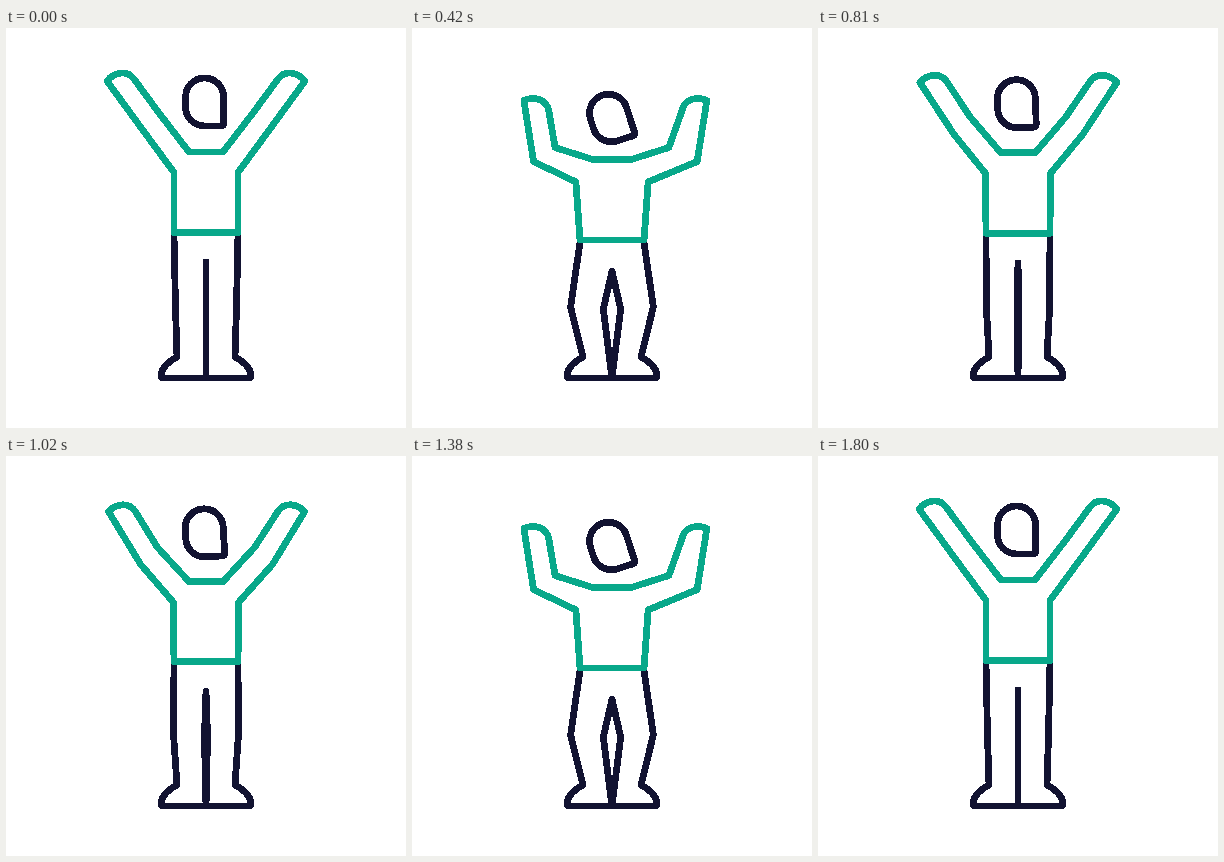
Recreate the animation shown at these times as an HTML page. Size 400x400 px, loop 3.33 s.

```html
<!DOCTYPE html>
<html lang="en">
<head>
<meta charset="utf-8">
<title>Stretching figure</title>
<style>
  html, body { margin: 0; width: 100%; height: 100%; overflow: hidden; background: #fff; }
  svg { display: block; width: 100%; height: 100%; }
  path {
    fill: none; stroke: #121331; stroke-width: 6.8;
    stroke-linecap: round; stroke-linejoin: round; shape-rendering: crispEdges;
  }
  #shirt { stroke: #08a88a; }
</style>
</head>
<body>
<svg viewBox="0 0 400 400">
  <path id="legs"/>
  <path id="shirt"/>
  <path id="head" d="M-19 -5 a19 19 0 0 1 38 0 V21 q0 3 -3 3 H0 a19 19 0 0 1 -19 -19 Z"/>
</svg>
<script>
const LOOP = 3330, STEP = 30, BEND = 450, ACTIVE = 4 * BEND, CENTER = 200;
const FOREARM_TURN = 27.4 * Math.PI / 180;

const byId = id => document.getElementById(id);
const legs = byId('legs'), shirt = byId('shirt'), head = byId('head');

// Two smooth bends down and up, then a rest.
function bendAt(time) {
  if (time >= ACTIVE) return 0;
  const phase = (time / BEND) % 2;
  const s = phase < 1 ? phase : 2 - phase;
  return s * s * (3 - 2 * s);
}

// Half outlines use x as the distance outward from the body's centre line.
function shirtHalf(side, bend) {
  const at = (x, y) => `${CENTER + side * x} ${y} `;
  const cos = Math.cos(FOREARM_TURN * bend), sin = Math.sin(FOREARM_TURN * bend);
  const elbowX = 62.5 + (19.5 + 3.4 * side) * bend;
  const elbowY = 103 + 31 * bend;
  const forearm = (x, y) => at(elbowX + x * cos + y * sin, elbowY + y * cos - x * sin);
  const neckY = 124 + 8 * bend, waistY = 204.5 + 7.5 * bend;

  return 'M' + at(0, neckY) +
    'L' + at(17 + bend, neckY) + at(47 + 10 * bend, 85 + 35 * bend) + forearm(9.5, -52) +
    'C' + forearm(17.5, -62.5) + forearm(30.5, -57.5) + forearm(36.5, -50) +
    'L' + at(elbowX, elbowY) + at(32 + 4.2 * bend, 144.5 + 9.5 * bend) +
    at(32, waistY) + at(0, waistY);
}

function legHalf(side, bend) {
  const at = (x, y) => `${CENTER + side * x} ${y} `;
  return 'M' + at(32, 207 + 7.5 * bend) +
    'L' + at(30.5 + 11 * bend, 279) + at(29, 329) +
    'C' + at(37, 333) + at(44.5, 340) + at(45, 347) +
    'Q' + at(45, 350) + at(43, 350) +
    'L' + at(0, 350) + at(8.8 * bend, 281) + at(0, 234 + 9.5 * bend);
}

const mirrored = (half, bend) => half(-1, bend) + half(1, bend);

function draw(time) {
  const bend = bendAt(Math.floor((time % LOOP) / STEP) * STEP);
  legs.setAttribute('d', mirrored(legHalf, bend));
  shirt.setAttribute('d', mirrored(shirtHalf, bend));
  head.setAttribute('transform',
    `translate(${198.6 - 0.6 * bend} ${74 + 16.2 * bend}) rotate(${-18 * bend})`);
}

const start = performance.now();
function tick() {
  draw(performance.now() - start);
  requestAnimationFrame(tick);
}
tick();
</script>
</body>
</html>
```
